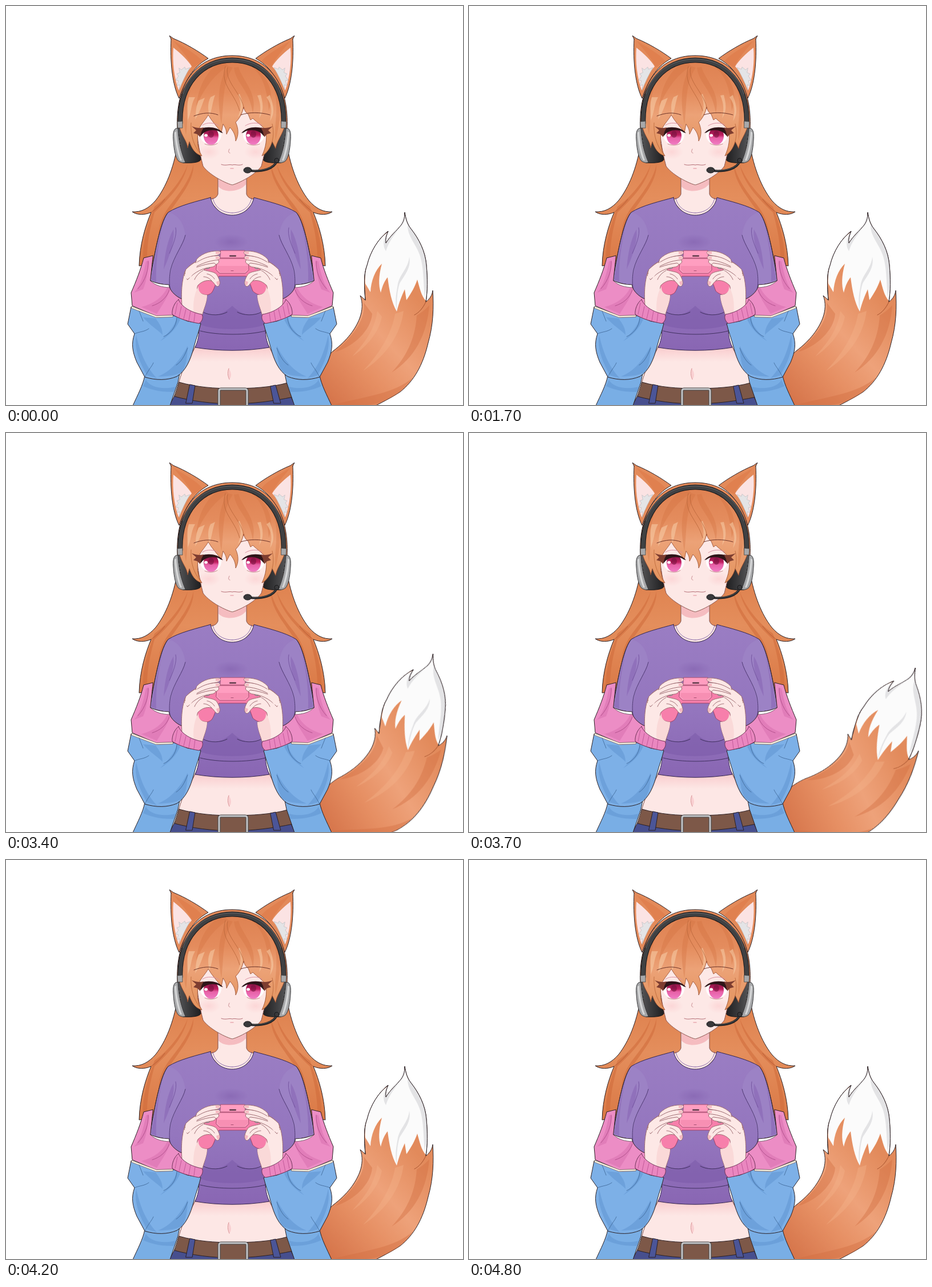
Animation of 800x700 px, one loop 4900 ms. Source, as an HTML page:

```html
<!DOCTYPE html>
<html lang="en">
<head>
<meta charset="utf-8">
<title>Fox girl gaming</title>
<style>
html, body { margin: 0; width: 100%; height: 100%; overflow: hidden; background: #fff; }
svg { display: block; width: 100vw; height: 100vh; stroke-linecap: round; stroke-linejoin: round; }
.o { stroke: #2b2024; }
.l { fill: none; }
.skin { fill: #fde8e6; }
.finger { stroke: #9c6a70; }
.hair { fill: #e38a5a; }

/* one loop is 4900 ms; every pose holds for 100 ms */
.tail, .lash, .lid, .ball, .tapL, .tapR, .mid { animation: 4900ms step-end infinite; }
.tail { animation-name: sway; transform-origin: 577px 658px; }
.lash { animation-name: lash; transform-origin: 0 220px; }
.lid { animation-name: lid; }
.ball { animation-name: ball; }
.tapL { animation-name: tapL; }
.tapR { animation-name: tapR; }
.mid { animation-name: mid; }
@keyframes sway {
  0%, 85.71%, 100% { transform: rotate(0deg); }
  61.22% { transform: rotate(0deg); animation-timing-function: steps(8); }
  77.55% { transform: rotate(20deg); animation-timing-function: steps(4); }
}
@keyframes lash {
  0%, 100% { transform: none; }
  87.75% { transform: translateY(3px); }
  89.79%, 97.95% { transform: translateY(6px) scaleY(.85); }
  91.83%, 95.91% { transform: translateY(13px) scaleY(.5); }
  93.87% { transform: translateY(18px) scaleY(-.6); }
}
@keyframes lid {
  0%, 100% { transform: none; }
  87.75% { transform: translateY(3px); }
  89.79%, 97.95% { transform: translateY(6px); }
  91.83%, 95.91% { transform: translateY(15px); }
  93.87% { transform: translateY(22px); }
}
@keyframes ball { 0%, 95.91%, 100% { opacity: 1; } 93.87% { opacity: 0; } }
@keyframes tapL {
  0%, 4.08%, 14.28%, 32.65%, 75.51%, 100% { opacity: 0; }
  2.04%, 12.24%, 30.61%, 73.46% { opacity: 1; }
}
@keyframes tapR { 0%, 34.69%, 44.89%, 100% { opacity: 0; } 32.65%, 42.85% { opacity: 1; } }
@keyframes mid {
  0%, 24.48%, 55.1%, 63.26%, 100% { transform: none; }
  22.44%, 53.06%, 61.22% { transform: translateY(-2px); }
}
</style>
</head>
<body>
<svg viewBox="0 0 800 700" preserveAspectRatio="none">
<defs>
  <linearGradient id="fur" gradientUnits="userSpaceOnUse" x1="560" y1="690" x2="735" y2="530"><stop stop-color="#d5744a"/><stop offset=".35" stop-color="#e68f63"/><stop offset=".62" stop-color="#eea27a"/><stop offset="1" stop-color="#e28a5b"/></linearGradient>
  <linearGradient id="mane" x2="0" y2="1"><stop stop-color="#de8151"/><stop offset=".35" stop-color="#e48c5d"/><stop offset=".58" stop-color="#eca277"/><stop offset="1" stop-color="#e3935d"/></linearGradient>
  <linearGradient id="back" x2="0" y2="1"><stop stop-color="#dd7f4c"/><stop offset=".45" stop-color="#e48e5c"/><stop offset="1" stop-color="#da7946"/></linearGradient>
  <linearGradient id="cloth" x2="0" y2="1"><stop stop-color="#9a7dc3"/><stop offset=".55" stop-color="#9476be"/><stop offset="1" stop-color="#8966b3"/></linearGradient>
  <linearGradient id="iris" x2="0" y2="1"><stop stop-color="#6d0d35"/><stop offset=".45" stop-color="#c01f60"/><stop offset=".6" stop-color="#e760a6"/><stop offset="1" stop-color="#f07cc4"/></linearGradient>
  <linearGradient id="belly" x2="0" y2="1"><stop stop-color="#f9c9cb"/><stop offset=".3" stop-color="#fde7e5"/></linearGradient>
  <linearGradient id="pad"><stop stop-color="#555557"/><stop offset=".5" stop-color="#38383a"/><stop offset="1" stop-color="#1d1d1f"/></linearGradient>
  <radialGradient id="blush"><stop stop-color="#fbc5c8" stop-opacity=".5"/><stop offset="1" stop-color="#fbc5c8" stop-opacity="0"/></radialGradient>
  <radialGradient id="dim"><stop stop-color="#7f5dab" stop-opacity=".5"/><stop offset="1" stop-color="#7f5dab" stop-opacity="0"/></radialGradient>

  <g id="backHair">
    <path fill="url(#back)" stroke="#2b2024" d="M396 240L300 245C293 285 280 318 262 341C250 355 237 362 221 361C229 367 243 367 254 362C244 386 234 418 233 456L268 450L290 362L396 340Z"/>
    <g fill="#d06b3b" opacity=".55">
      <path d="M318 278C312 310 286 338 260 362C252 390 246 420 247 448L240 450C238 420 247 385 260 352C290 330 310 300 318 278Z"/>
      <path d="M328 278C330 308 300 340 279 372L268 420C263 388 275 365 290 346C312 318 324 298 328 278Z"/>
    </g>
    <path class="l" stroke="#a9532f" d="M254 362C263 356 271 348 278 339" opacity=".7"/>
  </g>

  <g id="ear">
    <path class="hair" stroke="#2b2024" d="M289 58L286 52L293 57C315 66 338 80 354 92C332 104 316 124 303 162C291 138 287 98 289 58Z"/>
    <path fill="#fbe3e3" d="M293 73C306 83 319 96 325 106C314 118 306 134 302 148C294 124 291 98 293 73Z"/>
    <path fill="#d9703f" opacity=".4" d="M294 62C316 74 335 86 344 97L327 108C320 92 307 78 294 62Z"/>
    <path fill="#e4e4e6" stroke="#b7b7bb" stroke-width=".6" d="M303 109L307 112L313 107L314 111L322 108C315 120 308 134 303 148L304 138L299 140L302 131L297 130L302 123L299 119L304 117Z"/>
  </g>

  <g id="sleeve">
    <path fill="#9c82c5" d="M284 362C272 375 262 425 252 482C262 487 275 489 285 489C287 460 300 430 314 404C312 382 302 366 284 362Z"/>
    <path fill="#8663b2" opacity=".5" d="M275 380C266 410 260 450 254 480L263 484C262 455 265 425 275 380ZM293 392C296 412 286 440 276 462C278 434 283 410 293 392Z"/>
    <path class="l" stroke="#503a74" d="M314 402C310 420 294 438 288 463C284 484 286 505 298 520"/>
    <path class="l" stroke="#6c4c98" d="M297 389C300 402 292 420 286 434M362 337C366 357 384 363 396 363" stroke-width=".8"/>
    <path class="l" stroke="#2b2024" d="M252 482C262 487 275 489 285 489M252 482C262 420 272 375 284 362"/>
  </g>

  <g id="jacket">
    <g class="o">
      <path fill="#79aee5" d="M243 648C240 665 230 683 222 701L287 701L301 660L304 645Z"/>
      <path fill="#ec8dc5" d="M257 438L241 442C236 462 228 482 219 503L221 526L263 544L300 545L313 516C300 512 288 502 285 490C272 488 262 486 253 482Z"/>
      <path fill="#fff" stroke-width=".6" d="M253 482C263 487 274 489 285 489L286 494C273 493 262 491 253 482Z"/>
      <path fill="#7db0e7" d="M219 528L213 558L225 575C219 592 221 606 229 625L243 651C263 657 282 657 299 650C315 640 323 621 329 598C333 583 338 570 341 557L318 553L293 543L262 545Z"/>
    </g>
    <g fill="#5f93d0" opacity=".5">
      <path d="M228 577C224 600 232 622 247 648L264 653C244 632 234 605 228 577Z"/>
      <path d="M262 548C269 558 274 565 274 577C266 568 250 559 240 546ZM305 550C298 566 285 579 270 588C286 572 296 560 299 546ZM309 641C300 648 282 650 266 650C288 642 306 620 318 596C318 615 315 630 309 641Z"/>
      <path d="M245 656C252 668 272 674 297 668L294 677C270 678 251 672 240 667Z"/>
    </g>
    <g fill="#d86fae" opacity=".5">
      <path d="M245 448C240 472 236 490 224 503L240 497C247 481 248 463 250 446ZM283 492C276 510 258 523 237 528L264 540C274 524 284 510 287 496Z"/>
    </g>
    <path class="l" stroke="#68514d" stroke-width="4" d="M221 529L263 545L291 544"/>
    <path class="l" stroke="#f5eedf" stroke-width="2.500" d="M221 529L263 545L291 544"/>
    <path class="l" stroke="#3d6595" stroke-width=".8" d="M225 575C234 571 242 572 250 566M299 547C298 564 287 575 276 580M243 651C250 637 255 633 258 626M318 600C312 615 307 624 298 630M233 535L240 553"/>
    <path class="l" stroke="#a94883" stroke-width=".8" d="M249 448C250 462 244 482 231 496M286 498C281 513 269 522 256 526"/>
  </g>

  <g id="cuff">
    <path fill="#ea87c0" stroke="#6e3357" d="M302 515C307 528 325 538 343 541C346 546 343 554 338 557C321 554 303 549 291 541C290 532 295 520 302 515Z"/>
    <path class="l" stroke="#b94f90" stroke-width=".8" d="M300 521L296 541M307 527L303 546M315 532L311 549M323 535L320 552M331 538L329 554"/>
  </g>

  <path id="tap" class="skin finger" d="M347 435C350 426 359 425 362 431L360 434Z"/>
  <g id="hand" class="finger">
    <path class="skin" d="M308 526C306 495 309 480 313 466C320 452 338 446 350 440L372 446C375 452 366 455 356 456L346 463C356 466 367 466 370 473C375 482 376 489 371 492C366 492 364 484 359 482C350 480 342 484 336 490C332 498 338 506 352 507C352 518 347 530 343 544L310 541Z"/>
    <path fill="#fad9d8" stroke="none" d="M337 492C332 500 326 516 329 540L342 542C347 530 352 518 352 507C342 507 336 501 337 492Z"/>
    <path class="skin" d="M312 471C325 460 345 453 364 451C370 453 366 457 360 458C345 460 332 465 318 480Z"/>
    <path class="skin mid" d="M315 462C330 447 350 438 372 438C378 441 374 446 366 446C345 449 330 458 313 470Z"/>
    <path class="skin" d="M334 444C345 432 362 429 374 430C378 433 374 437 366 438C352 440 344 443 332 451Z"/>
    <path class="skin" stroke="none" d="M312 480L315 464L323 456L335 449L333 462L323 476Z"/>
    <path fill="none" d="M345 464C338 468 333 473 330 480M360 482C357 478 351 475 346 475M365 479C362 474 357 471 352 470"/>
    <path fill="#f6b9c1" stroke="none" d="M367 431L375 431L373 435L367 435ZM367 440L374 440L372 444L367 444ZM368 484L373 482L373 489L370 490Z"/>
  </g>

  <g id="eye">
    <g class="ball">
      <path fill="#fff" d="M339 226C344 214 370 211 377 222C378 234 371 243 359 243C349 243 342 238 339 226Z"/>
      <ellipse cx="359" cy="228" rx="13" ry="15.500" fill="url(#iris)"/>
      <ellipse cx="359" cy="225" rx="5" ry="6" fill="#74103e" opacity=".6"/>
    </g>
    <path class="lid skin" d="M335 188H382L379 221C370 213 345 214 338 227Z"/>
    <path class="l" stroke="#b56f78" stroke-width=".8" d="M348 242C355 245 364 245 370 241"/>
  </g>
  <g id="lashes" class="lash">
    <path fill="#2e1519" d="M380 223C371 212 353 211 342 215L339 229L342 227C349 217 367 215 376 222Z"/>
    <path fill="#7d3d30" d="M325 211C333 214 339 215 346 213L342 221L340 230L335 225L328 223L333 218Z"/>
    <path class="l" stroke="#d990a0" d="M344 209C352 203 366 205 373 210"/>
  </g>

  <g id="cup">
    <path fill="url(#pad)" stroke="#171719" d="M301 214L319 213C329 232 334 253 342 267C341 274 331 276 310 275Z"/>
    <path fill="#a5a6a8" stroke="#39393b" d="M297 215C293 217 292 225 293 236C294 253 297 267 302 272C306 275 311 276 314 274C307 258 302 238 301 215Z"/>
    <path fill="#d6d7d8" d="M295 222C296 240 299 258 305 271L308 271C302 255 299 237 298 220Z"/>
  </g>
</defs>

<g class="tail">
  <path id="brush" fill="url(#fur)" stroke="#2b2024" d="M535 655C550 630 560 616 573 605C598 586 612 566 619 548C624 535 625 520 620 508L629 516C627 490 626 470 632 455C638 430 652 408 669 395C665 404 664 410 665 416C672 404 684 394 692 384C697 377 698 370 698 362C700 374 702 382 709 391C723 409 734 430 736 455C738 478 738 500 735 519C742 514 746 507 747 499C749 528 748 560 739 591C730 630 714 658 690 677C660 697 620 712 560 750Z"/>
  <g fill="#cf6d40" opacity=".4">
    <path d="M741 525C737 576 716 617 675 643C707 609 717 575 719 543C725 539 735 532 741 525ZM626 520C631 550 606 581 576 607C610 597 639 568 641 540ZM712 652C680 680 630 685 575 699C630 706 681 700 712 652Z"/>
  </g>
  <path fill="#f4b48d" opacity=".35" d="M696 535C691 575 667 613 625 640C654 610 676 573 681 540ZM658 545C653 573 631 598 606 615C630 588 645 568 650 535Z"/>
  <path fill="#fbfbfb" d="M629 487L638 502C639 482 646 464 658 452C652 474 652 490 656 503C659 490 663 482 668 476C671 500 675 520 684 536C688 520 693 508 698 497L701 516C710 503 716 492 720 480C724 494 727 509 735 517C738 500 738 478 736 455C734 430 723 409 709 391C702 382 700 374 698 364C698 370 697 377 692 384C684 394 672 404 665 416C664 410 665 404 668 397C652 408 638 430 632 455C629 465 628 475 629 487Z"/>
  <path fill="#e3e3e5" d="M698 366C697 388 675 399 665 430C658 419 662 407 667 398C664 405 664 410 665 416C674 403 692 390 698 366ZM703 383C702 408 724 421 728 452C731 468 731 490 733 510C738 490 738 468 736 455C733 427 718 401 703 383ZM706 440C710 459 697 473 689 487C685 500 684 512 684 535C680 515 684 500 686 487C690 470 704 460 706 440Z"/>
  <path class="l" stroke="#2b2024" d="M629 516C627 490 626 470 632 455C638 430 652 408 669 395C665 404 664 410 665 416C672 404 684 394 692 384C697 377 698 370 698 362C700 374 702 382 709 391C723 409 734 430 736 455C738 478 738 500 735 519"/>
  <path class="l" stroke="#a7532e" d="M735 519C730 530 723 538 715 542"/>
</g>

<use href="#backHair"/><use href="#backHair" transform="matrix(-1 0 0 1 792 0)"/>

<path fill="#fde8e6" stroke="#7c4a48" d="M371 298V330C368 338 362 338 354 340L396 384L438 340C430 338 424 338 421 330V298Z"/>
<path fill="#f5bcc0" d="M372 303L396 315L420 303V313C409 326 383 329 372 317Z"/>

<g class="o">
  <path fill="url(#belly)" stroke="#7c4a48" d="M332 596C322 620 308 632 301 668L372 690H425L500 668C486 632 470 620 460 596Z"/>
  <path fill="#474f8e" d="M296 682L286 701H506L497 682Z"/>
  <path fill="#7d5848" d="M303 660C335 669 365 671 397 671C430 671 465 669 493 661L502 686C470 693 430 698 397 698C360 698 325 693 295 685Z"/>
  <path fill="#4b5598" d="M322 664L331 666L326 697H315ZM463 667L472 665L481 697H469Z"/>
</g>
<rect x="373" y="672" width="49" height="40" rx="3" fill="#7d5848" stroke="#444" stroke-width="5"/>
<rect x="373" y="672" width="49" height="40" rx="3" fill="none" stroke="#c4c5c8" stroke-width="3"/>
<path fill="#f7bfc3" opacity=".6" d="M390 636C395 643 395 651 391 655C389 649 389 642 390 636Z"/>
<path class="l" stroke="#d88f92" d="M390 636C387 644 389 651 391 655"/>

<path fill="url(#cloth)" stroke="#33264d" d="M358 336C363 359 382 367 396 367C410 367 429 359 434 336C455 342 490 350 508 362C520 375 530 420 540 480C530 486 520 488 508 490C506 505 502 515 497 520L470 545L455 556C452 575 457 590 461 599C420 606 372 606 331 599C335 590 340 575 337 556L295 520C289 512 286 500 284 490C270 488 260 486 252 482C262 420 272 375 284 362C302 350 337 342 358 336Z"/>
<use href="#sleeve"/><use href="#sleeve" transform="matrix(-1 0 0 1 792 0)"/>
<ellipse cx="394" cy="414" rx="30" ry="14" fill="url(#dim)"/>
<path fill="#7b58a8" opacity=".5" d="M342 536C362 548 382 540 396 526C410 540 430 548 450 536L455 558C430 570 362 570 338 558Z"/>
<path class="l" stroke="#40305f" d="M345 537C357 544 377 543 387 537M405 537C415 543 435 544 447 537M340 570C370 578 424 578 454 570"/>

<use href="#jacket"/><use href="#jacket" transform="matrix(-1 0 0 1 792 0)"/>

<g>
  <path fill="#f77fab" stroke="#9d4266" d="M350 446C360 442 368 441 375 441H418C430 441 438 444 443 450C452 465 460 485 457 500C452 510 440 508 432 500C428 490 425 478 420 474H373C368 480 366 495 360 503C352 510 338 509 335 500C332 485 342 462 350 446Z"/>
  <path fill="#ff9ec0" stroke="#a44e70" d="M376 429H418L419 442H375ZM370 443H424L425 463L419 469H374L368 463Z"/>
  <path fill="#f78fb3" d="M371 456H423L424 462L418 467H375L370 462Z"/>
  <path class="l" stroke="#3b2630" stroke-width="2" d="M392 438.500H402"/>
  <path class="l" stroke="#a44e70" d="M394 464.500H398"/>
  <g fill="#b9bfc1" stroke="#6f7577"><ellipse cx="352" cy="457" rx="6" ry="4"/><ellipse cx="440" cy="457" rx="6" ry="4"/></g>
</g>
<use href="#hand"/><use href="#hand" transform="matrix(-1 0 0 1 792 0)"/>
<g class="tapL"><use href="#tap"/></g>
<g class="tapR"><use href="#tap" transform="matrix(-1 0 0 1 792 0)"/></g>
<use href="#cuff"/><use href="#cuff" transform="matrix(-1 0 0 1 792 0)"/>

<use href="#ear"/><use href="#ear" transform="matrix(-1 0 0 1 791 0)"/>
<path class="hair" stroke="#2b2024" d="M300 216C296 140 330 87 396 87C462 87 496 140 492 216Z"/>
<use href="#cup"/><use href="#cup" transform="matrix(-1 0 0 1 791 0)"/>

<path class="skin" stroke="#8c5650" d="M332 180C332 220 338 255 345 281C354 294 379 309 396 314C413 309 438 294 447 281C454 255 460 220 460 180Z"/>
<ellipse cx="355" cy="256" rx="20" ry="13" fill="url(#blush)"/><ellipse cx="437" cy="256" rx="20" ry="13" fill="url(#blush)"/>
<use href="#eye"/><use href="#eye" transform="matrix(-1 0 0 1 792 0)"/>
<g class="ball" fill="#fff"><ellipse cx="350" cy="227" rx="3" ry="2.500"/><ellipse cx="424" cy="227" rx="3" ry="2.500"/></g>
<path class="l" stroke="#c4858a" d="M391 251C389 255 389 257 392 258"/>
<path class="l" stroke="#b06a72" d="M377 278C385 281 391 277 396 279C401 277 407 281 414 278"/>
<path class="l" stroke="#e9a8b0" stroke-width="1.500" d="M393 285H398"/>

<path fill="url(#mane)" stroke="#95492c" stroke-width=".8" d="M304 214C300 145 335 93 396 92C456 93 492 145 487 214C481 230 474 238 472 250L466 238C463 249 456 259 448 263C455 248 457 234 455 220C451 211 440 205 432 197L428 200L424 190C420 187 417 183 416 177C413 191 407 199 402 204C407 215 408 226 402 237C402 227 398 219 392 213L386 225C386 216 383 212 380 207L377 222C370 212 360 202 354 191C349 201 337 211 336 222C334 240 336 252 343 263C331 260 325 250 321 238L318 249C317 237 308 229 304 214Z"/>
<g fill="#d2703f" opacity=".35">
  <path d="M380 96C350 112 337 142 333 176C346 148 360 124 389 105ZM388 105C370 137 370 168 377 207C382 174 377 138 397 108ZM399 108C403 138 426 145 432 188C441 152 414 131 407 107ZM420 99C450 117 457 146 460 184C475 143 448 111 420 99ZM320 139C306 165 308 191 315 226C321 192 312 170 328 132ZM474 140C486 166 481 196 472 236C468 204 482 170 464 132Z"/>
</g>
<g fill="#f9d4ae" opacity=".5">
  <path d="M320 160C315 174 319 186 318 201C325 186 323 174 331 160ZM337 166C331 181 333 189 331 199C340 185 342 176 348 161ZM358 160C352 172 354 183 356 194C361 180 361 170 366 156ZM440 157C447 173 446 184 443 197C453 183 449 168 446 156ZM456 160C466 174 466 186 462 202C474 184 465 168 462 156ZM406 156C413 170 411 182 406 195C420 181 414 168 409 154Z"/>
</g>
<path class="l" stroke="#b86539" stroke-width=".8" d="M384 106C374 139 400 151 409 184M388 108C382 131 410 151 416 177M324 205C323 224 327 244 341 260M466 238C469 225 468 216 466 207"/>
<use href="#lashes"/><use href="#lashes" transform="matrix(-1 0 0 1 792 0)"/>
<path class="l" stroke="#6b3328" d="M329 193C344 187 358 186 371 191M411 191C426 186 445 186 462 191"/>

<g class="l">
  <path stroke="#161618" stroke-width="9" d="M305 205C303 137 343 95 396 95C449 95 488 137 486 205"/>
  <path stroke="#404143" stroke-width="7" d="M305 205C303 137 343 95 396 95C449 95 488 137 486 205"/>
  <path stroke="#58595c" stroke-width="1.500" d="M310 154C321 115 357 93 396 93C435 93 470 115 481 154"/>
</g>
<path fill="#a7a8aa" stroke="#444" stroke-width=".8" d="M300 203L309 202L309 214L301 214ZM482 202L491 203L490 214L482 214Z"/>
<path class="l" stroke="#252527" stroke-width="4" d="M474 272C469 286 449 291 426 289"/>
<path class="l" stroke="#58595b" d="M474 272C469 285 449 290 426 288"/>
<ellipse cx="423" cy="288" rx="7" ry="5" fill="#39393b" stroke="#171719"/>
<ellipse cx="474" cy="271" rx="4" ry="4" fill="#39393b" stroke="#171719"/>
</svg>
</body>
</html>
```
